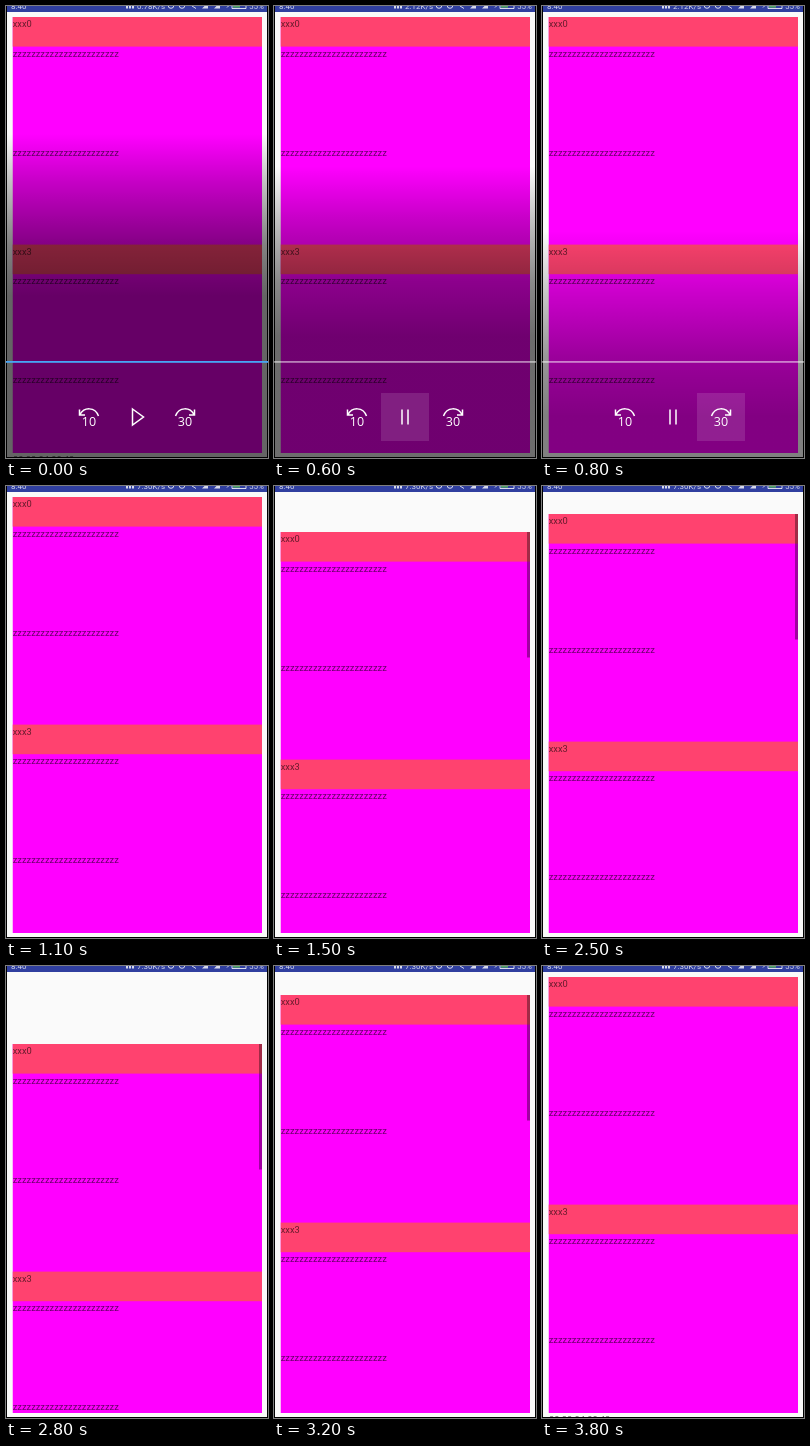
Animation of 262x452 px, one loop 3.9 s. Source, as an HTML page:

```html
<!DOCTYPE html>
<html lang="en">
<head>
<meta charset="utf-8">
<title>Overscroll list</title>
<style>
html, body { margin: 0; width: 100%; height: 100%; overflow: hidden; background: #000; }
svg { display: block; width: 262px; height: 452px; }
.row { font: 9.3px Roboto, sans-serif; fill: #000; fill-opacity: .6; }
.status { font: 8px Roboto, sans-serif; fill: #fff; fill-opacity: .8; }
.num { font: 12.5px "Open Sans", sans-serif; fill: #fff; text-anchor: middle; }
.icon { fill: none; stroke: #fff; stroke-width: 1.5; }
</style>
</head>
<body>
<svg viewBox="0 0 262 452">
  <defs>
    <clipPath id="view"><rect x="6.5" y="6" width="249.5" height="441"/></clipPath>
    <linearGradient id="shade" gradientUnits="userSpaceOnUse" x1="0" x2="0">
      <stop offset="0" stop-opacity="0"/>
      <stop offset=".3" stop-opacity=".38"/>
      <stop offset=".68" stop-opacity=".8"/>
      <stop offset="1"/>
    </linearGradient>
  </defs>
  <rect width="262" height="452"/>
  <rect x="1" width="260" height="451" fill="#fafafa"/>
  <rect x="1" width="260" height="6" fill="#303f9f"/>

  <g class="status">
    <text x="5" y="2.7">8:40</text>
    <text id="speed" x="131" y="2.7"></text>
    <text x="243" y="2.7">55%</text>
    <path d="M120 0h2v2.5h-2zM123 0h2v2.5h-2zM126 0h2v2.5h-2zM196 2.5l6-6v6zM208 2.5l6-6v6z"/>
    <g fill="none" stroke="#fff" stroke-opacity=".8">
      <circle cx="165" cy="-.5" r="2.8"/>
      <circle cx="176" cy="-.5" r="2.8"/>
      <path d="M186 0l4 2.5M221 1.5l2-2"/>
      <path d="M226 -2v4.5h14v-4.5"/>
    </g>
    <rect x="227" y="-2" width="7" height="3.6" fill="#5fc35a"/>
  </g>

  <g clip-path="url(#view)">
    <g id="list">
      <rect id="bar" x="253" y="11" width="3" height="125.5" fill="#000"/>
    </g>
  </g>
  <text id="clock" class="row" x="7" y="457">00:00:04 08:40</text>

  <rect id="dim" x="1" width="260" height="451" fill="url(#shade)"/>
  <g id="controls">
    <rect id="track" y="355" width="262" height="1.8"/>
    <rect id="hover" y="387" width="48" height="48" fill="#fff" fill-opacity=".12"/>
    <g class="icon">
      <path d="M73.5 403.5v5.5h5.5M74 408.5C78 401 89 400.500 92.500 410"/>
      <path d="M188.500 403.500v5.500h-5.500M188 408.500C184 401 173 400.500 169.500 410"/>
      <path id="play" d="M126.500 403L137.500 411L126.500 419Z"/>
      <path id="pause" d="M128 403.500v15M134 403.500v15"/>
    </g>
    <text class="num" x="83" y="420">10</text>
    <text class="num" x="179" y="420">30</text>
  </g>
</svg>
<script>
const LOOP = 3900, STEP = 100, HEAD = 29.6, CELL = 99;
const $ = id => document.getElementById(id);
const clamp = v => Math.max(0, Math.min(1, v));

// [time, pull distance]: drag down, let go, repeat
const pulls = [
  [1100, 0], [1600, 44], [1700, 0], [2100, 67], [2200, 18], [2300, 0],
  [2400, 0], [2800, 67], [2900, 18], [3000, 0], [3200, 18], [3300, 0]
];

function pullAt(t) {
  const i = pulls.findIndex(p => p[0] > t);
  if (i < 1) return 0;
  const [t0, a] = pulls[i - 1], [t1, b] = pulls[i];
  return a + (b - a) * (t - t0) / (t1 - t0);
}

function add(tag, attrs, text = '') {
  const el = document.createElementNS('http://www.w3.org/2000/svg', tag);
  for (const key in attrs) el.setAttribute(key, attrs[key]);
  el.textContent = text;
  $('list').insertBefore(el, $('bar'));
}

function buildList() {
  add('rect', { x: 6.5, y: 11, width: 249.5, height: 600, fill: '#f0f' });
  let y = 11;
  for (let i = 0; i < 6; i++) {
    const head = i % 3 === 0;
    if (head) add('rect', { x: 6.5, y, width: 249.5, height: HEAD, fill: '#ff426f' });
    add('text', { x: 6.7, y: y + 10.2, class: 'row' }, head ? 'xxx' + i : 'z'.repeat(23));
    y += head ? HEAD : CELL;
  }
}

const show = (id, on) => $(id).setAttribute('opacity', on);

function draw(time) {
  const t = Math.floor(time / STEP) * STEP;
  const playing = t >= 500;

  $('list').setAttribute('transform', `translate(0 ${Math.round(pullAt(t))})`);
  show('bar', t > 1100 ? .37 * clamp((3700 - t) / 400) : 0);
  $('speed').textContent = (t < 500 ? '0.78' : t < 1100 ? '2.12' : '7.30') + 'K/s';
  show('clock', t < 500 || t >= 3700 ? 1 : 0);

  // the shade sinks as playback starts, then fades away
  const sink = clamp((t - 500) / 300);
  $('shade').setAttribute('y1', 128 + 97 * sink);
  $('shade').setAttribute('y2', 290 + 120 * sink);
  show('dim', (.6 - .11 * sink) * clamp((1100 - t) / 300));

  show('controls', clamp((1000 - t) / 200));
  $('track').setAttribute('fill', playing ? '#fff' : '#48a5f5');
  $('track').setAttribute('fill-opacity', playing ? .5 : 1);
  show('play', playing ? 0 : 1);
  show('pause', playing ? 1 : 0);
  show('hover', t >= 300 ? 1 : 0);
  $('hover').setAttribute('x', t < 700 ? 107 : 155);
}

buildList();
const start = performance.now();
function tick() {
  draw((performance.now() - start) % LOOP);
  requestAnimationFrame(tick);
}
tick();
</script>
</body>
</html>
```
